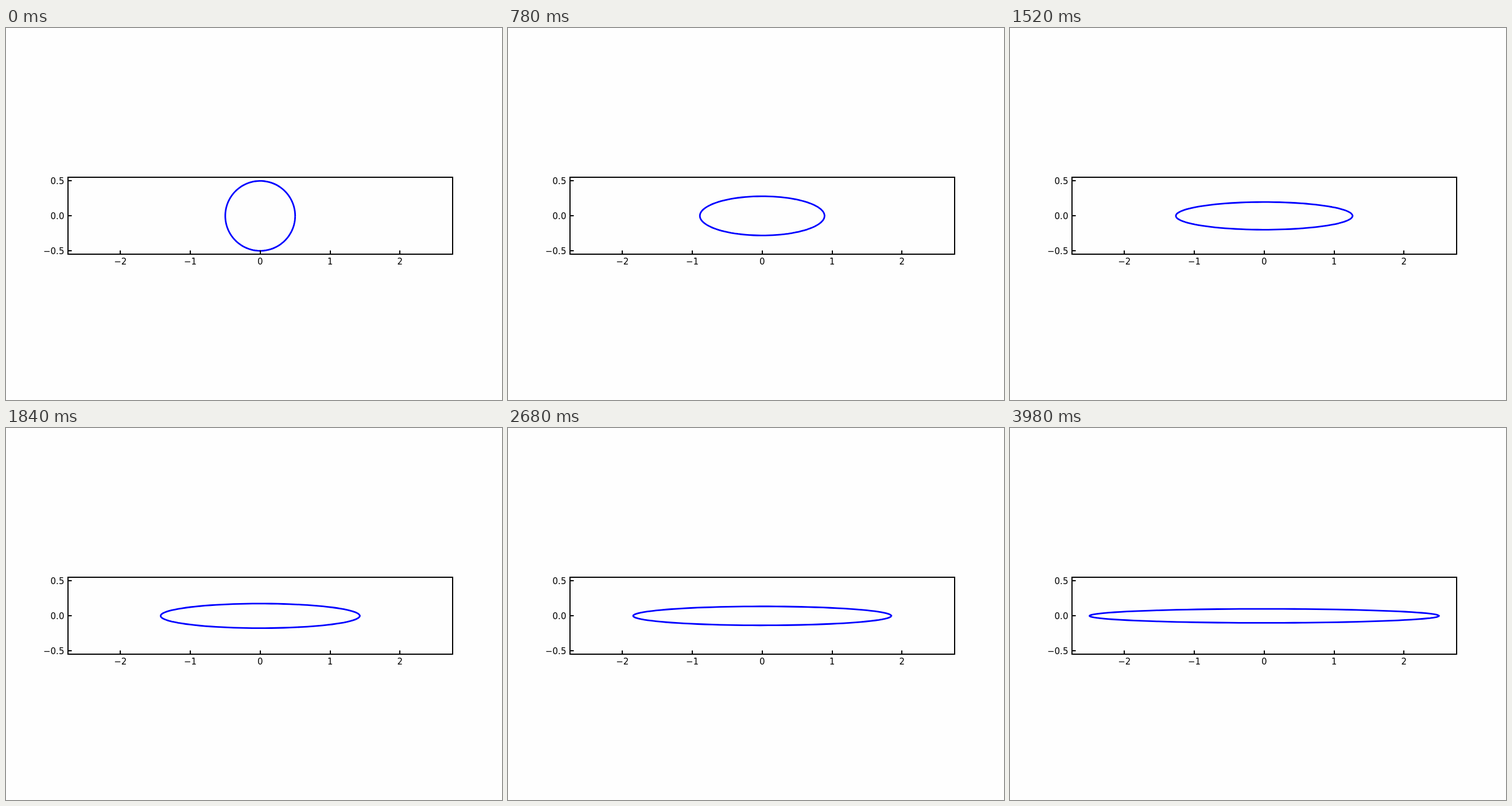
An HTML page for the animation above (4000 ms loop, 864x648 px).

```html
<!DOCTYPE html>
<html lang="en">
<head>
<meta charset="utf-8">
<title>Ellipse of constant area</title>
<style>
  html, body { margin: 0; width: 100%; height: 100%; overflow: hidden; background: #fefefe; }
  svg { display: block; width: 864px; height: 648px; }
  text { font: 15px "DejaVu Sans", sans-serif; fill: #000; }
  .axes { fill: none; stroke: #000; stroke-width: 2; }
  .curve { fill: none; stroke: #00f; stroke-width: 2.8125; stroke-linecap: square; stroke-linejoin: round; }
</style>
</head>
<body>
<svg viewBox="0 0 864 648">
  <path id="curve" class="curve"/>
  <path id="ticks" class="axes"/>
  <rect class="axes" x="108" y="260" width="670" height="134"/>
  <g id="labels"></g>
</svg>
<script>
  const CX = 442.8, CY = 327.24, UNIT = 669.6 / 5.5;
  const TICK = 6.56, POINTS = 100;
  const STEPS = 200, STEP_MS = 20;
  const byId = id => document.getElementById(id);
  const px = x => CX + x * UNIT;
  const py = y => CY - y * UNIT;

  function addLabel(value, digits, x, y, anchor) {
    const el = document.createElementNS("http://www.w3.org/2000/svg", "text");
    el.setAttribute("x", x);
    el.setAttribute("y", y);
    el.setAttribute("text-anchor", anchor);
    el.textContent = value.toFixed(digits).replace("-", "\u2212");
    byId("labels").append(el);
  }

  let ticks = "";
  for (const x of [-2, -1, 0, 1, 2]) {
    ticks += `M${Math.round(px(x))} 394v${-TICK}`;
    addLabel(x, 0, px(x), 412, "middle");
  }
  for (const y of [-0.5, 0, 0.5]) {
    ticks += `M108 ${Math.round(py(y))}h${TICK}`;
    addLabel(y, 1, 101.44, Math.round(py(y) + 5.45), "end");
  }
  byId("ticks").setAttribute("d", ticks);

  // The half axes keep a constant product, so the area never changes.
  function ellipse(a) {
    const b = 0.25 / a;
    const points = Array.from({ length: POINTS }, (_, k) => {
      const angle = 2 * Math.PI * k / (POINTS - 1);
      return px(a * Math.cos(angle)).toFixed(3) + " " + py(b * Math.sin(angle)).toFixed(3);
    });
    return "M" + points.join("L");
  }

  function draw() {
    const step = Math.floor(performance.now() / STEP_MS - start) % STEPS;
    byId("curve").setAttribute("d", ellipse(0.5 + 2 * step / (STEPS - 1)));
    requestAnimationFrame(draw);
  }

  const start = performance.now() / STEP_MS;
  draw();
</script>
</body>
</html>
```
